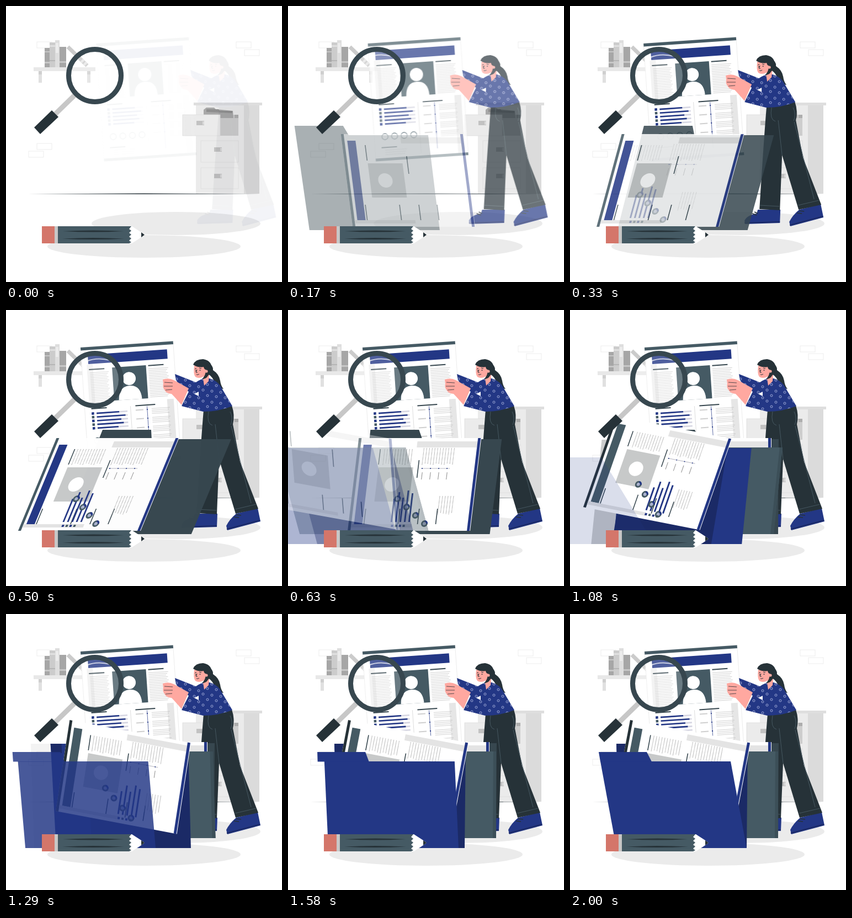
These frames come from a looping animation (500x500 px, 2.04 s). An HTML page:

```html
<!DOCTYPE html>
<html lang="en">
<head>
<meta charset="utf-8">
<title>Resume folder</title>
<style>
html, body { margin: 0; height: 100%; overflow: hidden; background: #fff; }
svg { display: block; width: 100vw; height: 100vh; }
</style>
</head>
<body>
<svg id="stage" viewBox="0 0 500 500"></svg>
<script>
const NAVY = '#233785', DEEP = '#1b2a66', SLATE = '#455a64', STEEL = '#37474f', INK = '#263238', SKIN = '#ffa8a0';

const rect = (x, y, w, h, fill, more = '') => `<rect x="${x}" y="${y}" width="${w}" height="${h}" fill="${fill}" ${more}/>`;
const box = (x, y, w, h, color) => rect(x, y, w, h, 'none', `stroke="${color}" stroke-width=".8"`);
const poly = (points, fill, more = '') => `<polygon points="${points}" fill="${fill}" ${more}/>`;
const path = (d, fill, more = '') => `<path d="${d}" fill="${fill}" ${more}/>`;
const line = (d, color, width = 1, more = '') => path(d, 'none', `stroke="${color}" stroke-width="${width}" ${more}`);
const disc = (x, y, r, fill, more = '') => `<circle cx="${x}" cy="${y}" r="${r}" fill="${fill}" ${more}/>`;
const group = (body, more = '') => `<g ${more}>${body}</g>`;
const repeat = (n, f) => Array.from({ length: n }, (_, i) => f(i)).join('');

// Fine rows or columns standing in for small print
const rows = (x, y, w, n, gap = 3) => repeat(n, i =>
  line(`M${x} ${y + i * gap}h${w - (i * 7 % 5)}`, '#b5b5b5', .6));
const columns = (x, y, h, n, gap = 5) => repeat(n, i =>
  line(`M${x + i * gap} ${y}v${h - (i * 3 % 4)}`, '#a8a8a8', 1.1, 'stroke-dasharray="1.2 .6"'));

function room() {
  const brick = (x, y) => box(x, y, 27, 11, '#e8e8e8');
  const handle = (x, y) => rect(x, y, 14, 8, '#c2c2c2') + rect(x + 11, y + 1, 3, 6, '#dadada');
  return [[56, 65], [417, 65], [432, 79], [56, 249], [41, 263]].map(p => brick(...p)).join('') +
    rect(59, 118, 6, 21, '#e0e0e0') + rect(147, 118, 6, 21, '#e0e0e0') +
    rect(59, 118, 6, 6, '#cfcfcf') + rect(147, 118, 6, 6, '#cfcfcf') +
    rect(50, 111, 112, 7, '#e8e8e8') +
    rect(70, 76, 9, 35, '#a6a6a6') + rect(70, 82, 9, 2, '#c7c7c7') + rect(70, 101, 9, 3, '#c7c7c7') +
    rect(79, 66, 10, 45, '#cccccc') + rect(79, 71, 10, 3, '#e0e0e0') + rect(79, 98, 10, 2, '#b5b5b5') +
    rect(89, 62, 8, 49, '#dedede') + rect(90, 67, 5, 18, '#ececec') +
    rect(97, 74, 12, 37, '#a6a6a6') + rect(97, 100, 12, 3, '#c7c7c7') +
    line('M112 74L147 108', '#cbcbcb', 7) + line('M137 98l3 3M142 103l3 3', '#e6e6e6', 7) +
    rect(344, 180, 87, 160, '#ebebeb') + rect(431, 180, 28, 160, '#dbdbdb') +
    rect(340, 175, 124, 5, '#dedede') +
    box(353, 244, 68, 39, '#dcdcdc') + box(353, 293, 68, 38, '#dcdcdc') +
    handle(377, 256) + handle(377, 304) +
    rect(388, 197, 33, 38, '#cdcdcd') +
    poly('358,188 363,184 377,184 380,187 411,190 412,203 358,203', '#a8a8a8') +
    poly('363,187 385,187 387,190 410,190 410,194 363,192', '#8f8f8f') + rect(414, 197, 7, 6, '#adadad') +
    rect(320, 197, 68, 38, '#ebebeb', 'stroke="#dcdcdc" stroke-width=".8"') + handle(345, 208) +
    poly('40,340.4 250,339.5 460,340.4 250,341.1', INK) +
    '<ellipse cx="308" cy="394" rx="153" ry="21" fill="#ebebeb"/>' +
    '<ellipse cx="250" cy="435.5" rx="175" ry="20.5" fill="#ebebeb"/>';
}

function resume() {
  const heading = (x, y, w = 28) => rect(x, y, w, 2, STEEL);
  const skills = [41, 52, 44, 48, 38];
  return group(
    rect(0, 0, 168, 214, '#fff', 'stroke="#e3e3e3" stroke-width=".7"') +
    rect(0, 0, 168, 5.5, SLATE) + rect(0, 209, 168, 5, SLATE) +
    rect(9, 32, 11, 72, '#f0f0f0') + rect(150, 104, 12, 105, '#e6e6e6') +
    rect(12, 14, 144, 17, NAVY) +
    rect(54.5, 40, 61.5, 60, SLATE) + disc(84, 62, 12, '#fff') +
    path('M63 100Q64 75 84 75Q104 75 105 100Z', '#fff') +
    heading(12.5, 40) + rows(14, 47, 34, 19) + heading(120, 40) + rows(120, 47, 36, 18) +
    heading(12, 111) + heading(92, 111, 36) +
    skills.map((w, i) => {
      const y = 119.5 + i * 6.7;
      return rect(12, y - 1, 4.5, 4.5, i % 2 ? SLATE : NAVY) + rect(21, y, 56, 2.6, '#d6d6e2') + rect(21, y, w, 2.6, NAVY);
    }).join('') +
    line('M83 112v92', '#cfcfcf', .7) + line('M113 114v84', NAVY, .7) +
    repeat(4, i => disc(113, 120 + i * 16, 1.1, NAVY) + rect(92, 119 + i * 16, 14, 2, '#cfcfcf') +
      rows(121, 119 + i * 16, 33, 4)) +
    repeat(4, i => disc(19.5 + i * 17.4, 170.5, 5.5, 'none', `stroke="${SLATE}" stroke-width="1.3"`)) +
    heading(12, 189) + rows(18, 195, 40, 3, 4),
    'transform="translate(135 68) rotate(-3.9)"');
}

function woman() {
  const blouse = 'M306 116L344 131Q352 125 364 123Q383 126 391 142L410 174Q386 184 357 184L318 174L331 148Q314 138 308 127Z';
  return path('M318 389Q322 379 340 376L342 369H383L382 393L319 395Z', NAVY) +
    path('M399 391Q405 379 417 369L456 359L461 383L401 399Z', NAVY) +
    line('M318 393L382 391M400 397L460 381', DEEP, 2) +
    line('M332 376l8 3M336 373l6 3M413 375l9 1M417 371l9 1', INK, 1.5) +
    path('M358 181Q353 240 345 368L382 370L386 270L416 369L457 360L424 275L411 207Q415 190 409 173Z', INK) +
    line('M367 184Q363 206 374 209M379 207L386 270M406 184Q412 196 407 208M408 210L444 350M346 361L381 363M415 361L453 352', '#4d606a', .8) +
    path('M364 94Q376 100 375 109Q386 116 388 128Q389 137 394 143Q384 142 378 133Q376 122 366 116Z', INK) +
    path('M357 114L368 113L368 132L360 136Z', SKIN) +
    `<clipPath id="blouse">${path(blouse, '#000')}</clipPath>` + path(blouse, NAVY) +
    group(repeat(48, i => {
      const r = Math.floor(i / 8), c = i % 8;
      return disc(309 + c * 16 + r % 2 * 8, 125 + r * 10 + c % 3 * 2, 2, 'none', 'stroke="#b9c2e8" stroke-width=".8"');
    }), 'clip-path="url(#blouse)"') +
    path('M357 124L368 117L367 129L359 137Z', SKIN) +
    poly('341,152 349,148 349,156', '#fff') +
    path('M284 126Q294 122 304 127L331 142L318 172Q306 158 300 152Q290 151 288 146Q283 140 285 134Z', SKIN) +
    line('M287 131L302 132M286 138L302 138M289 145L301 144', INK, .8) +
    path('M341 101Q339 116 343 121Q349 125 357 121Q366 115 366 104L360 97Z', SKIN) +
    path('M339 99Q343 89 357 89Q371 91 373 104Q373 113 366 119Q363 125 355 125Q362 119 362 108Q359 108 358 103Q348 105 339 99Z', INK) +
    disc(363, 111, 2.6, SKIN) +
    line('M342 107l3 -1M350 105l4 1M346 108l-2 5h3M345 117q3 1 5 -1', INK, 1) +
    disc(344, 110, .9, INK) + disc(351.5, 109, .9, INK);
}

// One printed page, 222 x 168, shared by both folders
const page = (id, edge, strip, barX) =>
  rect(0, 0, 222, 168, '#fff') + rect(0, 0, 5, 168, edge) + rect(10, 12, 15, 144, strip) +
  rect(5, 156, 110, 6, '#e3e3e3') + rect(107, 6, 109, 11, '#e4e4e4') +
  line('M41.5 20v28M114 40v32', STEEL, 1.6) + line('M28 128v28M90 128v28M125 128v28M158 128v28', STEEL, 1.6) +
  rect(42, 53, 63, 62, '#c7c9c9') + disc(70, 84, 13, '#fff') +
  group(
    columns(48, 20, 29, 11) + columns(119, 18, 31, 12) +
    line('M118 55h52', '#8c8c9c', .6) +
    repeat(4, i => disc(120 + i * 15, 55, 1, NAVY) + line(`M${121 + i * 15} 62v13`, '#8a8a8a', 1)) +
    columns(158, 105, 34, 6) +
    repeat(5, i => line(`M${barX + i * 8} ${[110, 98, 108, 95, 100][i]}V152`, NAVY, 3)) +
    repeat(4, i => disc(82 + i * 18, 110 + i * 15, 4.5, '#aab2cf', `stroke="${SLATE}" stroke-width="3"`) +
      line(`M${82 + i * 18} ${105.5 + i * 15}a4.5 4.5 0 0 1 4.5 4.5`, NAVY, 3)) +
    repeat(4, i => rect(barX + i * 7, 157, 4, 4, i % 2 ? SLATE : NAVY)),
    `id="${id}"`) +
  rect(216, 0, 5, 168, NAVY);

const pencil = () =>
  rect(65, 399, 23, 31, '#d4766a') + rect(88, 399, 6, 31, '#c7c7c7') +
  poly('222,399 228,399 245,410 251,414.5 245,419 228,430 222,430', '#fff') +
  path('M94 399H227l-4 5l4 3l-4 4l4 3l-4 4l4 3l-4 4l4 3l-4 2H94Z', SLATE) +
  path('M103 408Q158 405 213 408Q158 411 103 408ZM102 421.5Q158 418.5 214 421.5Q158 424.5 102 421.5Z', INK) +
  poly('245,410 251,414.5 245,419', INK);

const magnifier = () =>
  line('M126 160L88 197', '#c7c7c7', 9) + poly('51,220 83,189 95,201 62,232', INK) +
  line('M146 93Q164 85 189 91', '#fff', 2, 'opacity=".7"') +
  disc(161, 126, 47.5, '#fff', `fill-opacity=".2" stroke="${STEEL}" stroke-width="9"`);

const stage = document.getElementById('stage');
const layer = (id, body) => group(body, `id="${id}"`);
stage.innerHTML = room() +
  layer('hero', resume() + woman()) +
  layer('greyBack', poly('138,217 226,217 234,234 378,234 377,406 141,406', STEEL)) +
  layer('greyPage', group(page('greyPrint', SLATE, NAVY, 76), 'transform="translate(143 232)"')) +
  layer('greyFront', rect(142, 249, 235, 157, SLATE) + poly('372,249 377,249 377,406 371,406', '#3c4f58')) +
  layer('spare', rect(48, 235, 56, 189, '#cbcccc')) +
  layer('blueBack', poly('84,235 160,235 168,250 320,250 320,424 88,424', NAVY) + poly('84,235 104,235 104,252 85,252', DEEP)) +
  layer('bluePage', poly('322,236 320,424 140,424 140,300', DEEP) +
    group(page('bluePrint', INK, SLATE, 112), 'transform="translate(109 192) rotate(10.8)"')) +
  layer('blueFront', poly('55,267 291,267 320,424 84,424', NAVY)) +
  layer('blueTab', poly('52,250 139,250 148,267.5 55,267.5', NAVY)) +
  pencil() + magnifier();

function bezier(x1, y1, x2, y2) {
  const at = (a, b, s) => 3 * a * s * (1 - s) ** 2 + 3 * b * s * s * (1 - s) + s ** 3;
  return x => {
    if (x <= 0) return 0;
    if (x >= 1) return 1;
    let lo = 0, hi = 1;
    for (let i = 0; i < 24; i++) {
      const mid = (lo + hi) / 2;
      if (at(x1, x2, mid) < x) lo = mid; else hi = mid;
    }
    return at(y1, y2, lo);
  };
}
const ease = bezier(.25, .1, .25, 1);
const overshoot = bezier(.36, -.01, .5, 1.38);
const clamp = x => Math.max(0, Math.min(1, x));

const LOOP = 2040, RUSH = 900, SLIDE = 500;
// id, start in ms, lean at arrival in degrees, pivot height, travel
const parts = [
  ['greyBack', 30, -23, 311, 200],
  ['greyPage', 30, -23, 110, 110],
  ['greyFront', 505, -10, 327, 225],
  ['spare', 505, -10, 329, 225],
  ['blueBack', 505, -10, 337, 225],
  ['bluePage', 510, -13, 20, 300],
  ['blueFront', 1005, -13, 345, 240],
  ['blueTab', 1005, -13, 258, 240]
];
// id, start in ms, offset
const slides = [['hero', -64, 30], ['greyPrint', 170, -30], ['bluePrint', 650, -30]];

function place(id, x, tilt, pivot, opacity) {
  const k = Math.tan(tilt * Math.PI / 180), el = document.getElementById(id);
  el.setAttribute('transform', `matrix(1 0 ${k} 1 ${x - k * pivot} 0)`);
  el.setAttribute('opacity', clamp(opacity));
}

function slide(id, start, offset, t) {
  const p = overshoot((t - start) / SLIDE);
  place(id, offset * (1 - p), 0, 0, p);
}

// Rush in from the left, lean back, rock forward, settle
function rush(id, start, lean, pivot, travel, t) {
  const x = (t - start) / RUSH, p = ease(x / .6);
  const tilt = x < .6 ? 30 + (lean - 30) * p
    : x < .8 ? lean + (5 - lean) * ease((x - .6) / .2)
    : 5 * (1 - ease((x - .8) / .2));
  const leave = id === 'spare' ? 1 - clamp((t - 1100) / 250) : 1;
  place(id, -travel * (1 - p), tilt, pivot, p * leave);
}

let begin;
function draw(now) {
  begin ??= now;
  const t = (now - begin) % LOOP;
  slides.forEach(item => slide(...item, t));
  parts.forEach(part => rush(...part, t));
  requestAnimationFrame(draw);
}
requestAnimationFrame(draw);
</script>
</body>
</html>
```
